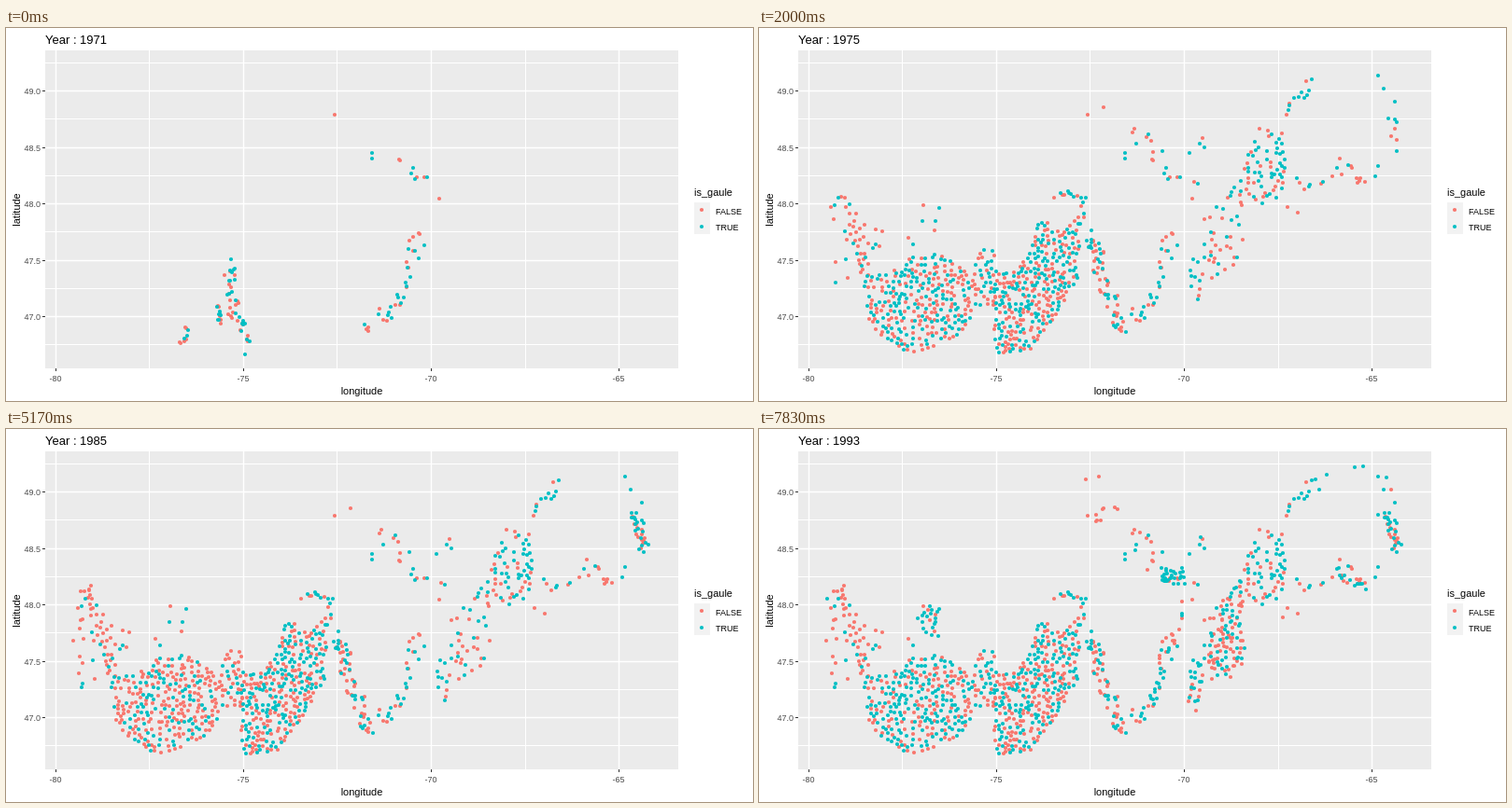
These frames come from a looping animation (800x400 px, 8000 ms). An HTML page:

```html
<!DOCTYPE html>
<html lang="en">
<head>
<meta charset="utf-8">
<title>Points by year</title>
<style>
  html, body { margin: 0; width: 100%; height: 100%; overflow: hidden; background: #fff; }
  svg { display: block; width: 100%; height: 100%; font: 11px "Liberation Sans", Arial, sans-serif; }
  .tick { font-size: 9px; fill: #4d4d4d; }
  .grid { stroke: #fff; }
  .mark { stroke: #333; }
  .dots { fill: none; stroke-width: 4.2; stroke-linecap: round; }
</style>
</head>
<body>
<svg viewBox="0 0 800 400">
  <rect x="42" y="24" width="678" height="341" fill="#ebebeb"/>
  <g id="axes"></g>
  <path id="red" class="dots" stroke="#f8766d"/>
  <path id="teal" class="dots" stroke="#00bfc4"/>
  <text id="title" x="42" y="17" font-size="13"></text>
  <text x="381" y="393" text-anchor="middle">longitude</text>
  <text transform="translate(15 195) rotate(-90)" text-anchor="middle">latitude</text>
  <text x="737" y="180">is_gaule</text>
  <rect x="737" y="187" width="17" height="34" fill="#f2f2f2"/>
  <path class="dots" stroke="#f8766d" d="M745 195h0"/>
  <path class="dots" stroke="#00bfc4" d="M745 213h0"/>
  <text x="760" y="200" font-size="9">FALSE</text>
  <text x="760" y="217" font-size="9">TRUE</text>
</svg>
<script>
const byId = id => document.getElementById(id);

// ---- axes ----
const lonX = lon => Math.round(455 + (lon + 70) * 40.22) + 0.5;
const latY = lat => Math.round(310 - (lat - 47) * 121) - 0.5;
let axes = '';
const line = (cls, d, width = 1) => axes += `<path class="${cls}" d="${d}" stroke-width="${width}"/>`;
const label = (x, y, anchor, text) =>
  axes += `<text class="tick" x="${x}" y="${y}" text-anchor="${anchor}">${text}</text>`;

for (let lon = -77.5; lon < -65; lon += 5) line('grid', `M${lonX(lon)} 24V365`);
for (let lat = 46.75; lat < 49.5; lat += 0.5) line('grid', `M42 ${latY(lat)}H720`);
for (let lon = -80; lon <= -65; lon += 5) {
  const x = lonX(lon);
  line('grid', `M${x} 24V365`, 1.4);
  line('mark', `M${x} 365v3`);
  label(x - 0.5, 379, 'middle', lon);
}
for (let lat = 47; lat <= 49; lat += 0.5) {
  const y = latY(lat);
  line('grid', `M42 ${y}H720`, 1.4);
  line('mark', `M39 ${y}h3`);
  label(37, y + 3.5, 'end', lat.toFixed(1));
}
byId('axes').innerHTML = axes;

// ---- points ----
let seed = 71;
function random() {
  seed = (seed * 1664525 + 1013904223) % 4294967296;
  return seed / 4294967296;
}
const pairs = list => list.flatMap((v, i) => i % 2 ? [] : [[v, list[i + 1]]]);
const dots = [];

// share: part of the dots that are teal, a number or a function of the year
function add(x, y, from, share, to = Infinity) {
  dots.push({ x: Math.round(x), y: Math.round(y), from, to, share, rank: random() });
}
function spots(from, share, coords) {
  for (const [x, y] of pairs(coords)) add(x, y, from, share);
}
function strip(from, share, n, spread, coords, to) {
  const path = pairs(coords);
  for (let i = 0; i < n; i++) {
    const u = (i + 0.5) / n * (path.length - 1), k = Math.floor(u), f = u - k;
    const at = axis => path[k][axis] * (1 - f) + path[k + 1][axis] * f + (random() * 2 - 1) * spread;
    add(at(0), at(1), from, share, to);
  }
}
function inside(poly, x, y) {
  let hit = false;
  poly.forEach(([ax, ay], i) => {
    const [bx, by] = poly[(i + 1) % poly.length];
    if ((ay > y) !== (by > y) && x < ax + (bx - ax) * (y - ay) / (by - ay)) hit = !hit;
  });
  return hit;
}
function area(from, share, n, coords, to) {
  const poly = pairs(coords), placed = [];
  const xs = poly.map(p => p[0]), ys = poly.map(p => p[1]);
  const between = v => Math.min(...v) + random() * (Math.max(...v) - Math.min(...v));
  for (let tries = 0; placed.length < n && tries < n * 30; tries++) {
    const x = between(xs), y = between(ys);
    if (!inside(poly, x, y) || placed.some(p => Math.hypot(p[0] - x, p[1] - y) < 3.2)) continue;
    placed.push([x, y]);
    add(x, y, from, share, to);
  }
}

const west = y => y > 1990 ? 0.34 + (y - 1990) * 0.09 : 0.5 - 0.16 * Math.min(1, Math.max(0, (y - 1976) / 5));
const centre = y => y < 1990 ? 0.5 : 0.46;

// long-lived eastern points
spots(1971, 0, [352, 93, 422, 142, 421, 141, 440, 160, 448, 160, 464, 183, 442, 220, 443, 221,
  436, 224, 432, 228, 436, 239, 429, 251, 431, 257, 429, 278, 422, 297, 417, 297, 400, 301,
  404, 313, 408, 314, 386, 323, 388, 321, 388, 325]);
spots(1971, 1, [392, 134, 392, 140, 436, 150, 434, 156, 438, 162, 451, 160, 431, 237, 438, 239,
  448, 233, 442, 247, 430, 257, 433, 267, 428, 273, 429, 277, 419, 286, 420, 289, 426, 289,
  423, 295, 412, 299, 399, 307, 410, 305, 409, 308, 413, 311, 384, 318]);

// first western survey
strip(1971, 0.5, 44, 6, [244, 251, 238, 272, 244, 290, 244, 310, 254, 318, 257, 346], 1974);
strip(1971, 0.6, 12, 2, [228, 297, 229, 317], 1974);
strip(1971, 0.6, 9, 4, [196, 320, 188, 342], 1974);

// west and centre
area(1972, west, 320, [106, 255, 120, 262, 140, 264, 160, 244, 192, 240, 225, 258, 240, 235, 256, 240,
  254, 296, 230, 300, 223, 325, 200, 336, 178, 346, 160, 350, 140, 335, 118, 322, 114, 290]);
area(1972, 0.5, 26, [182, 262, 186, 238, 193, 223, 208, 224, 238, 234, 220, 262], 1976);
area(1973, 0.55, 46, [238, 230, 258, 240, 279, 247, 276, 290, 262, 312, 250, 300], 1976);
area(1974, centre, 310, [250, 305, 254, 260, 275, 262, 290, 240, 300, 203, 322, 218, 345, 200,
  341, 268, 330, 290, 308, 326, 286, 350, 254, 348]);
strip(1974, 0.35, 16, 3, [317, 180, 333, 178, 348, 182, 345, 210]);
strip(1974, 0.5, 56, 7, [354, 222, 362, 240, 366, 265, 376, 290, 388, 324]);
area(1976, 0.3, 30, [74, 190, 92, 174, 106, 200, 133, 218, 130, 238, 110, 240, 80, 216]);
strip(1976, 0.4, 10, 5, [108, 236, 116, 262]);
spots(1976, 0, [82, 251, 95, 268, 176, 190, 160, 225, 188, 217]);
spots(1976, 1, [82, 273, 93, 248, 193, 193, 175, 207, 189, 207, 165, 232]);

// east
spots(1975, 0, [369, 85, 400, 112, 402, 108, 415, 117, 420, 121, 422, 133, 475, 118, 466, 165,
  566, 192, 577, 198, 586, 57, 622, 140, 677, 116, 681, 108, 683, 120]);
spots(1975, 1, [404, 124, 417, 114, 432, 132, 461, 134, 472, 124, 477, 128, 470, 167, 592, 55,
  663, 51, 669, 65, 674, 97, 681, 79, 681, 98, 683, 101, 683, 132]);
area(1975, 0.5, 52, [459, 280, 464, 240, 476, 200, 488, 193, 518, 160, 519, 230, 512, 266,
  495, 268, 482, 272, 466, 300]);
area(1975, 0.58, 62, [518, 150, 535, 107, 560, 111, 565, 150, 562, 180, 540, 190, 519, 182]);
strip(1975, 0.75, 10, 3, [562, 92, 567, 80, 582, 72, 590, 68]);
strip(1975, 0.5, 20, 5, [575, 164, 588, 172, 617, 155, 634, 147, 642, 172, 665, 149]);

// later additions
strip(1985, 0.25, 16, 4, [82, 173, 92, 168, 94, 185, 85, 205, 75, 232, 79, 282]);
strip(1985, 0.6, 24, 5, [673, 88, 678, 108, 684, 130]);
strip(1986, 0.7, 12, 4, [616, 150, 634, 165, 653, 170]);
spots(1987, 0.4, [600, 65, 596, 54, 677, 65]);
spots(1989, 0, [350, 54, 361, 92, 362, 98, 366, 98, 361, 99, 368, 86, 384, 86, 408, 111, 416, 151]);
spots(1990, 1, [73, 182, 608, 49, 647, 40, 672, 52, 432, 162, 437, 163, 453, 200]);
spots(1992, 0, [364, 51, 381, 84, 561, 202]);
spots(1992, 1, [638, 41, 403, 130, 473, 116, 663, 92]);
area(1992, 0.8, 22, [428, 146, 446, 153, 457, 144, 456, 168, 434, 166]);
strip(1992, 0.7, 18, 4, [455, 182, 447, 224, 434, 238, 429, 272, 420, 296]);
area(1992, 0.4, 72, [488, 192, 518, 160, 520, 240, 512, 268, 495, 270, 480, 250]);
strip(1992, 0.5, 12, 5, [478, 250, 464, 280, 464, 299]);
area(1992, 0.9, 18, [168, 206, 178, 188, 193, 192, 194, 222, 176, 224]);

// ---- playback: a step of each year already shows the next year's points ----
function stateAt(frame) {
  const [start, length, first] = frame < 9 ? [1971, 3, 0] : [1974, 2, 9];
  const year = start + Math.floor((frame - first) / length);
  const ahead = (frame - first) % length === length - 1;
  return { year, dataYear: ahead ? year + 1 : year };
}
let shown = -1;
function draw(now) {
  const frame = Math.min(47, Math.floor((now % 8000 + 5) * 0.006));
  if (frame !== shown) {
    shown = frame;
    const { year, dataYear } = stateAt(frame);
    let red = '', teal = '';
    for (const { x, y, from, to, share, rank } of dots) {
      if (dataYear < from || dataYear >= to) continue;
      const d = `M${x} ${y}h0`;
      if (rank < (typeof share === 'function' ? share(dataYear) : share)) teal += d;
      else red += d;
    }
    byId('red').setAttribute('d', red);
    byId('teal').setAttribute('d', teal);
    byId('title').textContent = `Year : ${year}`;
  }
  requestAnimationFrame(draw);
}
const began = performance.now();
draw(0);
function loop() { draw(performance.now() - began); }
</script>
</body>
</html>
```
